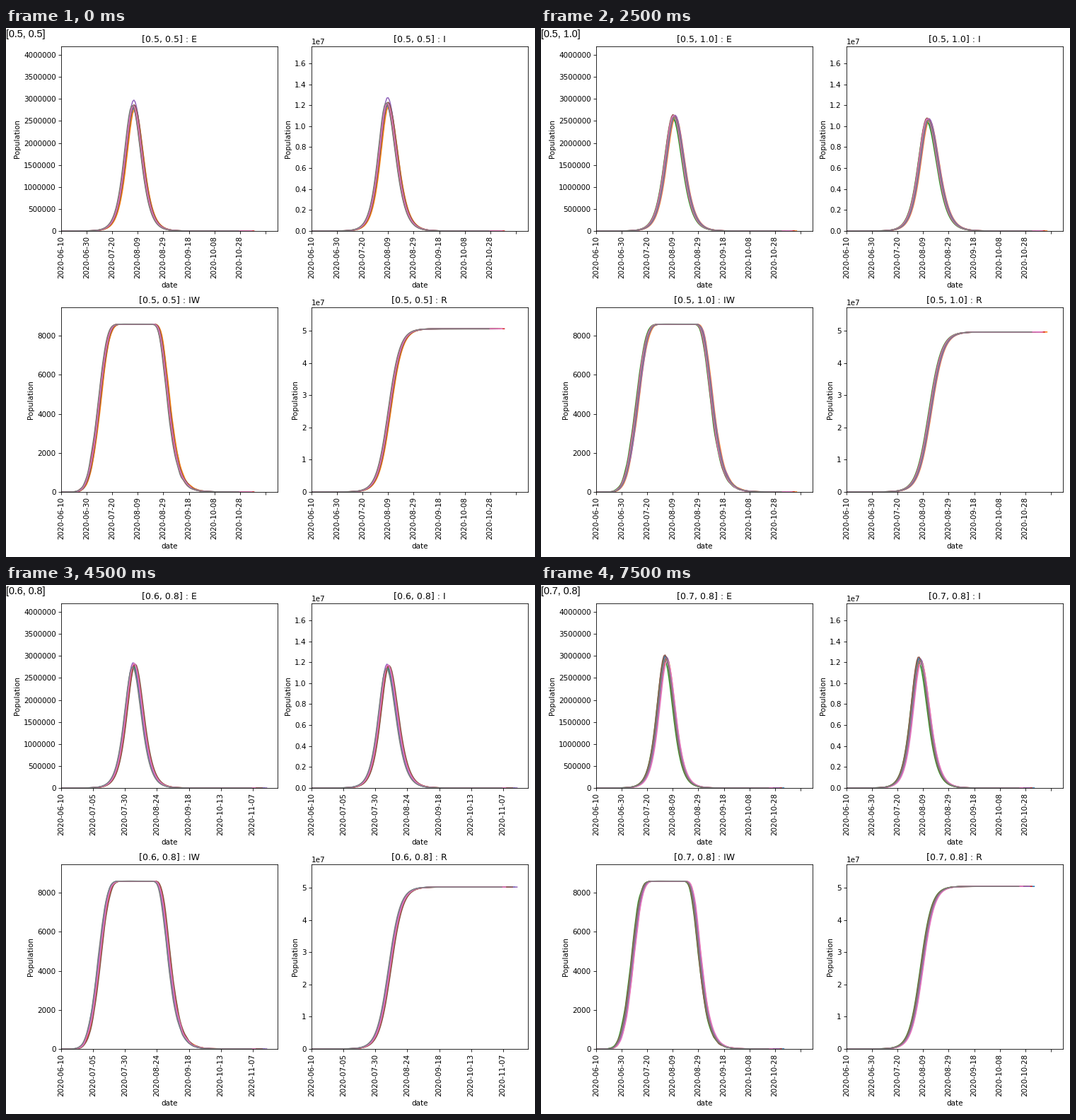
Recreate the animation shown at these times as a matplotlib script. Size 748 by 748 pixels, loop 8000 ms.

```python
import matplotlib.pyplot as plt
import numpy as np
from matplotlib.animation import FuncAnimation
from matplotlib.ticker import FixedFormatter, FixedLocator

SIZE = 748
AX_W, AX_H = 305.6, 261
DAY_PX = 1.805
WARDS = 8588
RUNS = 8

plt.rcParams["font.family"] = "DejaVu Sans"
plt.rcParams["axes.formatter.limits"] = (-7, 7)

CASES = [(a / 10, b / 10) for a in (5, 6, 7) for b in range(5, 11)][:16]
LAST_DAYS = [151, 156, 152, 161, 163.5, 157, 152, 152.5,
             153, 161, 168.5, 175, 148, 142, 144.5, 147]


def bell(t, peak, left, right):
    """Skewed epidemic wave of height 1."""
    u = t - peak
    return np.cosh(u / np.where(u < 0, left, right)) ** -2


def wards(t, peak, width, rng):
    """Infected wards: a fast rise, a full plateau and a noisy fall."""
    start = peak - 2.92 * width
    rise = 1 - np.exp(-np.log(2) * (np.maximum(t - start, 0) / (1.38 * width)) ** 4.7)
    fall = 1 - np.exp(-np.log(2) * np.exp(-3.4 * ((t - peak) / width - 1.59)))
    p = rise * fall
    noise = np.convolve(rng.normal(size=t.size), (0.5, 0.7, 0.5), "same")
    return np.clip(WARDS * p + 0.8 * noise * np.sqrt(WARDS * p * (1 - p)), 0, WARDS)


def run_curves(k):
    """For every run: days and the four series E, I, IW, R."""
    a, b = CASES[k][0] - 0.5, CASES[k][1] - 0.5
    rng = np.random.default_rng(k + 3)
    mid_peak = 56.7 + 8.7 * b - a * (19 + 16 * b)
    e_top = 2.86e6 - 0.52e6 * b + 1.1e6 * a
    i_top = 1.225e7 - 0.33e7 * b + 0.42e7 * a
    r_top = 5.06e7 - 0.2e7 * (b - a)
    width = r_top / e_top

    shifts = rng.permutation(np.linspace(-1.1, 1.1, RUNS))
    gains = rng.normal(1, 0.012, RUNS)
    ends = LAST_DAYS[k] - np.append(rng.permutation(RUNS - 1) * 1.8, 12)
    runs = []
    for shift, gain, end in zip(shifts, gains, ends):
        t = np.append(np.arange(0, end), end)
        peak = mid_peak + shift
        runs.append((t, (
            gain * e_top * bell(t, peak, 0.48 * width, 0.52 * width),
            gain * i_top * bell(t, peak + 2.75, 0.48 * width, 0.56 * width),
            wards(t, peak, width, rng),
            r_top * (1 + np.tanh((t - peak - 4.4) / (0.52 * width))) / 2)))
    return runs


def day_ticks(k):
    days = np.arange(0, 151, 25) if LAST_DAYS[k] > 160 else np.arange(0, 161, 20)
    start = np.datetime64("2020-06-10")
    return days, [str(start + int(d)) if d < 160 else "" for d in days]


fig = plt.figure(figsize=(10, 10), dpi=SIZE / 10, facecolor="white")
caption = fig.text(0, 1 - 13.5 / SIZE, "", family="Liberation Sans",
                   fontsize=14.4 * 720 / SIZE)

# name, left and bottom in px, top value, tick step
PANELS = [("E", 78, 461, 4.193e6, 5e5), ("I", 432, 461, 1.761e7, 2e6),
          ("IW", 78, 92, 9448, 2000), ("R", 432, 92, 5.724e7, 1e7)]
axes, lines = [], []
for name, left, bottom, top, step in PANELS:
    ax = fig.add_axes([left / SIZE, bottom / SIZE, AX_W / SIZE, AX_H / SIZE])
    ax.set_xlim(0, AX_W / DAY_PX)
    ax.set_ylim(0, top)
    ax.set_yticks(np.arange(0, top, step))
    ax.set_xlabel("date")
    ax.set_ylabel("Population")
    ax.tick_params(axis="x", rotation=90)
    axes.append(ax)
    lines.append([ax.plot([], [], color=f"C{n}", lw=1.5)[0] for n in range(RUNS)])

DATA = [run_curves(k) for k in range(len(CASES))]


def update(k):
    label = "[{}, {}]".format(*CASES[k])
    caption.set_text(label)
    days, names = day_ticks(k)
    for p, ax in enumerate(axes):
        ax.set_title(f"{label} : {PANELS[p][0]}")
        ax.xaxis.set_major_locator(FixedLocator(days))
        ax.xaxis.set_major_formatter(FixedFormatter(names))
        for line, (t, series) in zip(lines[p], DATA[k]):
            line.set_data(t, series[p])
    return [caption]


anim = FuncAnimation(fig, update, frames=len(CASES), interval=500,
                     init_func=lambda: update(0), repeat=True, blit=False)
plt.show()
```
